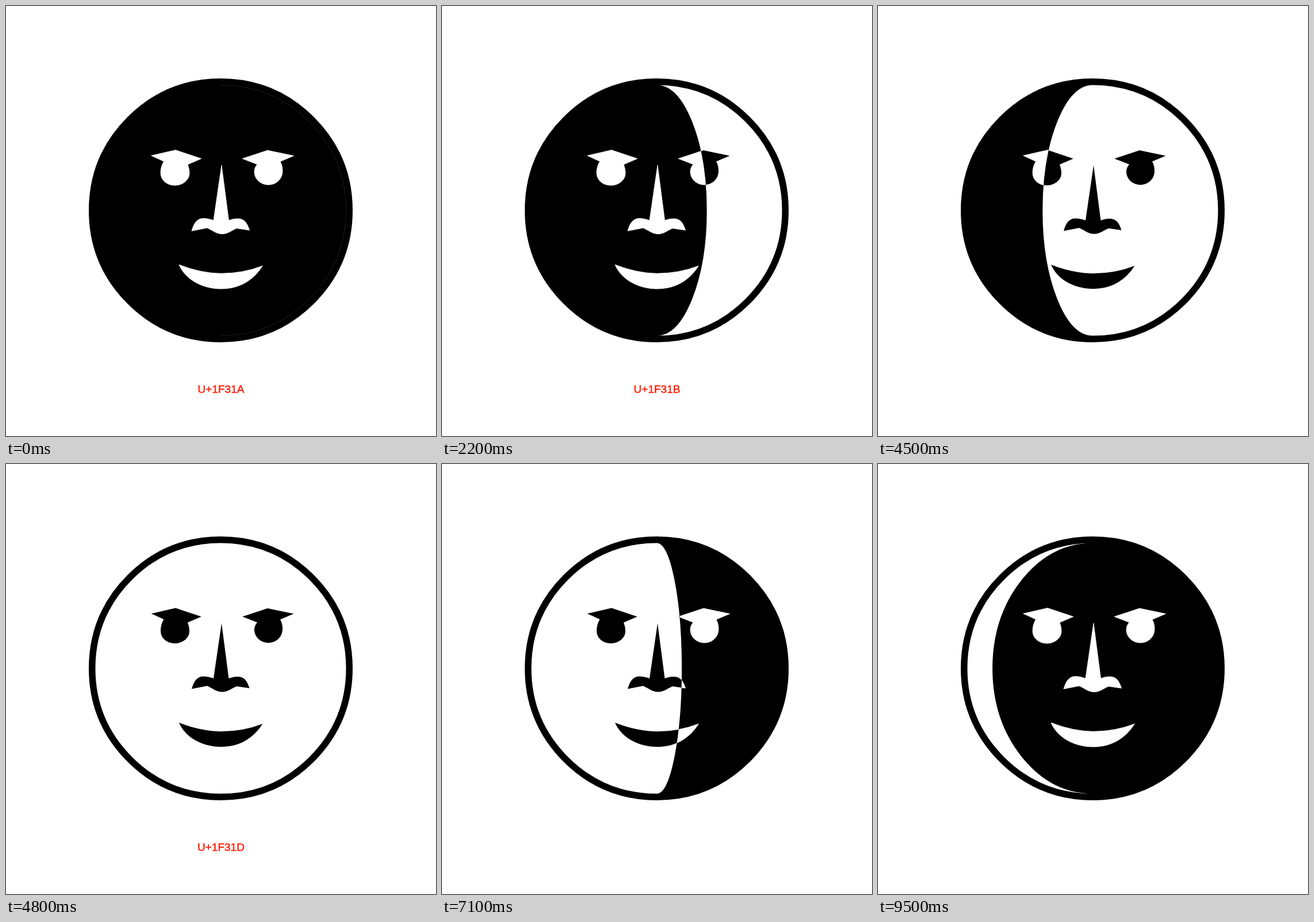
An HTML page for the animation above (9.6 s loop, 748 px wide and 748 px high).

```html
<!DOCTYPE html>
<html lang="en">
<head>
<meta charset="utf-8">
<title>Moon faces</title>
<style>
  html, body { margin: 0; width: 100%; height: 100%; overflow: hidden; background: #fff; }
  svg { display: block; width: 100%; height: 100%; }
  text { font: 19px "Liberation Sans", Arial, sans-serif; fill: #ff1a00; stroke: #ff1a00; stroke-width: .45; text-anchor: middle; }
</style>
</head>
<body>
<svg viewBox="0 0 748 748">
  <defs>
    <clipPath id="clip"><path id="lit"/></clipPath>
    <g id="face">
      <path d="M252.7 260.2L295 250.6 339.8 265.5 316 275.7C318 281 319 286 319 291C319 302 308 312 294 312C280 312 269 303 269 290C269 283 271 276 274.5 270.3Z"/>
      <path d="M411.2 265.5L455 251.1 500.5 260.6 477 270.6C480 276 481 281 481 287C481 301 470 311 456.5 311C443 311 432 301 432 288C432 283 434 279 437 275.5Z"/>
      <path d="M375 277L387.5 373C394 370.5 399 370 403 370C414 370 419 376 423.5 390L401 386.7C391 391 386 396.5 376 396.5C366 396.5 361 391 350 386L323 391.3C327 377 333 369.5 343 369.5C350 369.5 355 371 361 373Z"/>
      <path d="M301 450Q340 465.2 375 465.2Q413 465 446.3 452C430 478 405 492 374 492C342 492 312 476 301 450Z"/>
    </g>
  </defs>
  <path id="disc"/>
  <path id="seam" fill="none" stroke="#2a2a2a" stroke-width=".7"/>
  <use href="#face" fill="#fff" stroke="#fff" stroke-width=".8" stroke-miterlimit="10"/>
  <g clip-path="url(#clip)">
    <rect width="748" height="748" fill="#fff"/>
    <use href="#face"/>
  </g>
  <text id="label" x="374" y="673"></text>
</svg>
<script>
  const $ = id => document.getElementById(id);
  const CX = 373.5, CY = 355.5, RIM = 229.5, R = 218;
  const STEPS = 20, LOOP = 9600;
  const labels = { 0: 'U+1F31A', 3: 'U+1F31B', 10: 'U+1F31D', 17: 'U+1F31C' };

  // Half an oval as four quadratic curves, like a font outline.
  // A negative rx bulges left, a negative ry runs from bottom to top.
  function half(rx, ry) {
    const at = (turn, k) => {
      const a = turn * Math.PI / 4;
      return `${CX + rx * k * Math.sin(a)} ${CY - ry * k * Math.cos(a)} `;
    };
    const out = 1 / Math.cos(Math.PI / 8);
    let d = '';
    for (let i = 1; i <= 4; i++) d += 'Q' + at(i - .5, out) + at(i, 1);
    return d;
  }
  const from = r => `M${CX} ${CY - r}`;

  // Labelled phases rest for two seconds, the others pass in a tenth.
  function stepAt(ms) {
    let n = 0;
    for (let end = 0; n < STEPS - 1; n++) {
      end += labels[n] ? 2000 : 100;
      if (ms < end) break;
    }
    return n;
  }

  // The lit area lies between one limb and the terminator.
  function litPath(n) {
    const waxing = n <= 10;
    const edge = 1 - (waxing ? n : n - 10) / 5;
    return from(R) + half(waxing ? R : -R, R) + half(edge * R, -R) + 'Z';
  }

  let shown = -1;
  function draw(now) {
    const n = stepAt(now % LOOP);
    if (n !== shown) {
      shown = n;
      $('lit').setAttribute('d', n ? litPath(n) : '');
      $('label').textContent = labels[n] || '';
      $('seam').style.display = n ? 'none' : '';
    }
  }

  $('disc').setAttribute('d', from(RIM) + half(RIM, RIM) + half(-RIM, -RIM) + 'Z');
  $('seam').setAttribute('d', from(R) + half(R, R));

  const start = performance.now();
  function tick() {
    draw(performance.now() - start);
    requestAnimationFrame(tick);
  }
  tick();
</script>
</body>
</html>
```
